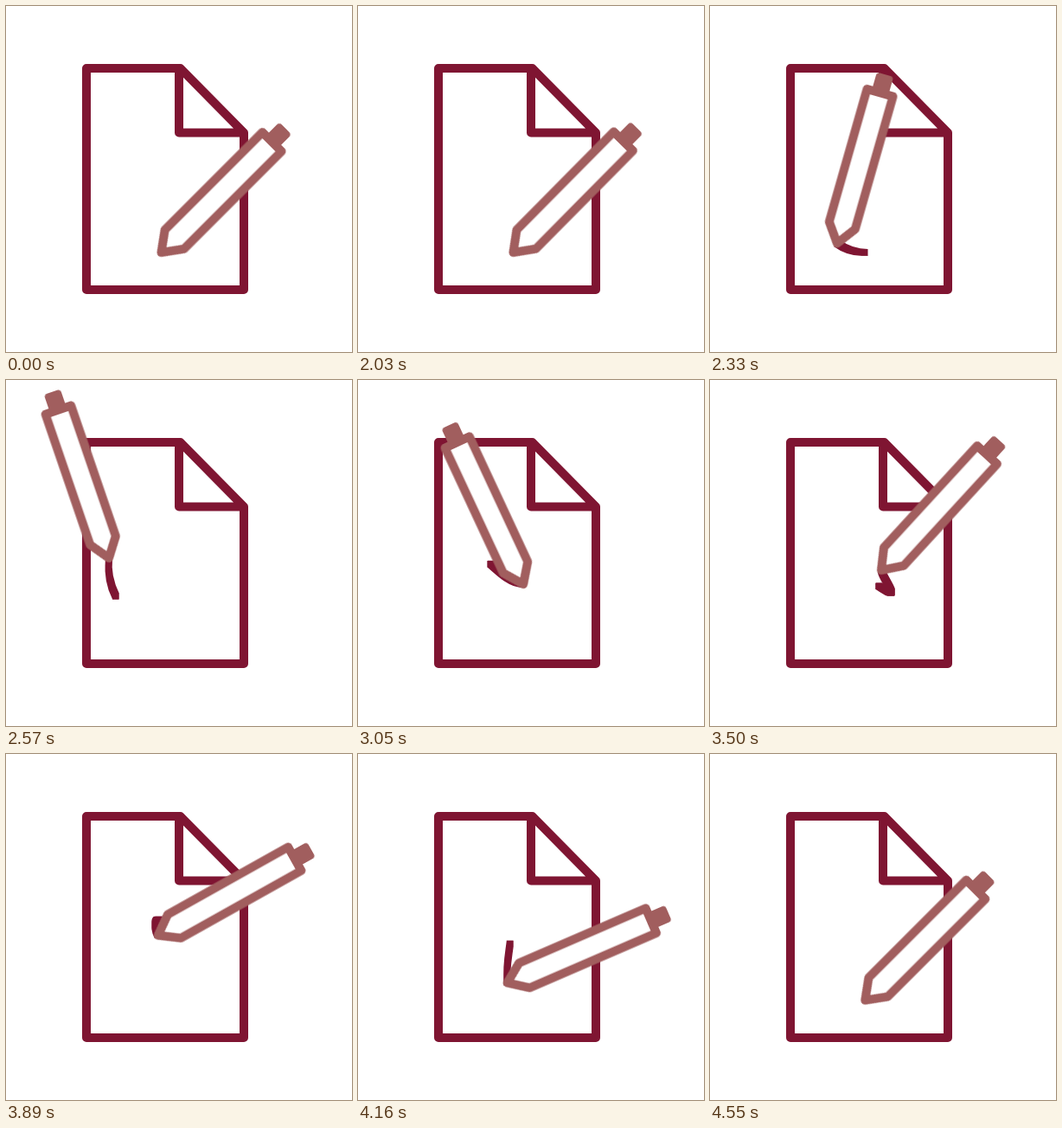
These frames come from a looping animation (400x400 px, 4640 ms). An HTML page without scripts:

```html
<!DOCTYPE html>
<html lang="en">
<head>
<meta charset="utf-8">
<title>Writing pen</title>
<style>
  @property --along { syntax: "<length>"; inherits: true; initial-value: 0px; }
  @property --trail { syntax: "<length>"; inherits: true; initial-value: 46px; }

  :root {
    --ink: #7f1532;
    --wood: #a15e5e;
    --scribble: path("M179.5 285 C140 285 115 245 119 206 C121 190 126 262 134 261 C142 260 138 215 148 209 C158 215 172 234 191 236 C199 240 210 249 210 245 C208 238 199 226 198 220 C196 208 182 188 174 192 C171 195 172 203 176 210 C178 222 164 262 179.5 285");
  }
  html, body { margin: 0; width: 100%; height: 100%; overflow: hidden; background: #fff; }
  svg {
    display: block; width: 100%; height: 100%;
    animation: travel 4640ms linear infinite, fade 4640ms linear infinite;
  }
  .page {
    fill: none; stroke: var(--ink); stroke-width: 10;
    stroke-linejoin: round; stroke-linecap: round;
  }
  .trail {
    d: var(--scribble);
    fill: none; stroke: var(--ink); stroke-width: 2;
    stroke-dasharray: var(--trail) 600px;
    stroke-dashoffset: calc(var(--trail) - var(--along));
  }
  .tip {
    offset-path: var(--scribble);
    offset-rotate: 0deg;
    offset-distance: var(--along);
  }
  .pen { animation: tilt 4640ms linear infinite; }
  .body { fill: #fff; stroke: var(--wood); stroke-width: 10; stroke-linejoin: round; }
  .cap { fill: var(--wood); }

  /* Distance of the pen tip along the scribble */
  @keyframes travel {
    0% { --along: 0px; }
    43.53% { --along: 0px; animation-timing-function: cubic-bezier(.5, 0, .8, .65); }
    55.39% { --along: 111.7px; }
    60.34% { --along: 174px; }
    63.15% { --along: 229px; }
    65.73% { --along: 281px; }
    66.38% { --along: 286.5px; }
    75.43% { --along: 331px; }
    78.02% { --along: 341.5px; }
    83.84% { --along: 389.3px; }
    89.66% { --along: 444.5px; animation-timing-function: ease-out; }
    98.06%, 100% { --along: 466px; }
  }

  /* The ink behind the tip runs out at the end */
  @keyframes fade {
    0%, 89.66% { --trail: 46px; }
    97%, 100% { --trail: 0px; }
  }

  @keyframes tilt {
    0% { transform: rotate(45deg); }
    43.53% { transform: rotate(45deg); animation-timing-function: cubic-bezier(.45, .1, .7, .75); }
    55.39% { transform: rotate(-18.8deg); animation-timing-function: cubic-bezier(.3, .5, .6, 1); }
    60.34% { transform: rotate(-33deg); animation-timing-function: cubic-bezier(.5, 0, .8, .5); }
    65.73% { transform: rotate(-25.1deg); animation-timing-function: cubic-bezier(.4, .3, .65, .9); }
    75.43% { transform: rotate(42.5deg); }
    83.84% { transform: rotate(60.7deg); animation-timing-function: ease-out; }
    88.79% { transform: rotate(67deg); animation-timing-function: ease-in-out; }
    98.06%, 100% { transform: rotate(45deg); }
  }
</style>
</head>
<body>
<svg viewBox="0 0 400 400">
  <!-- Widens the thin trail as a square nib would -->
  <filter id="nib" filterUnits="userSpaceOnUse" x="0" y="0" width="400" height="400" color-interpolation-filters="sRGB">
    <feMorphology operator="dilate" radius="3"/>
  </filter>
  <path class="page" d="M93 72H201.5L275 146.5V328H93ZM200 72V146.5H275"/>
  <g filter="url(#nib)"><path class="trail"/></g>
  <g class="tip">
    <g class="pen">
      <rect class="cap" x="-10" y="-203" width="20" height="22" rx="4"/>
      <path class="body" d="M0 0L-15.6 -21.5V-181H15.6V-21.5Z"/>
    </g>
  </g>
</svg>
</body>
</html>
```
